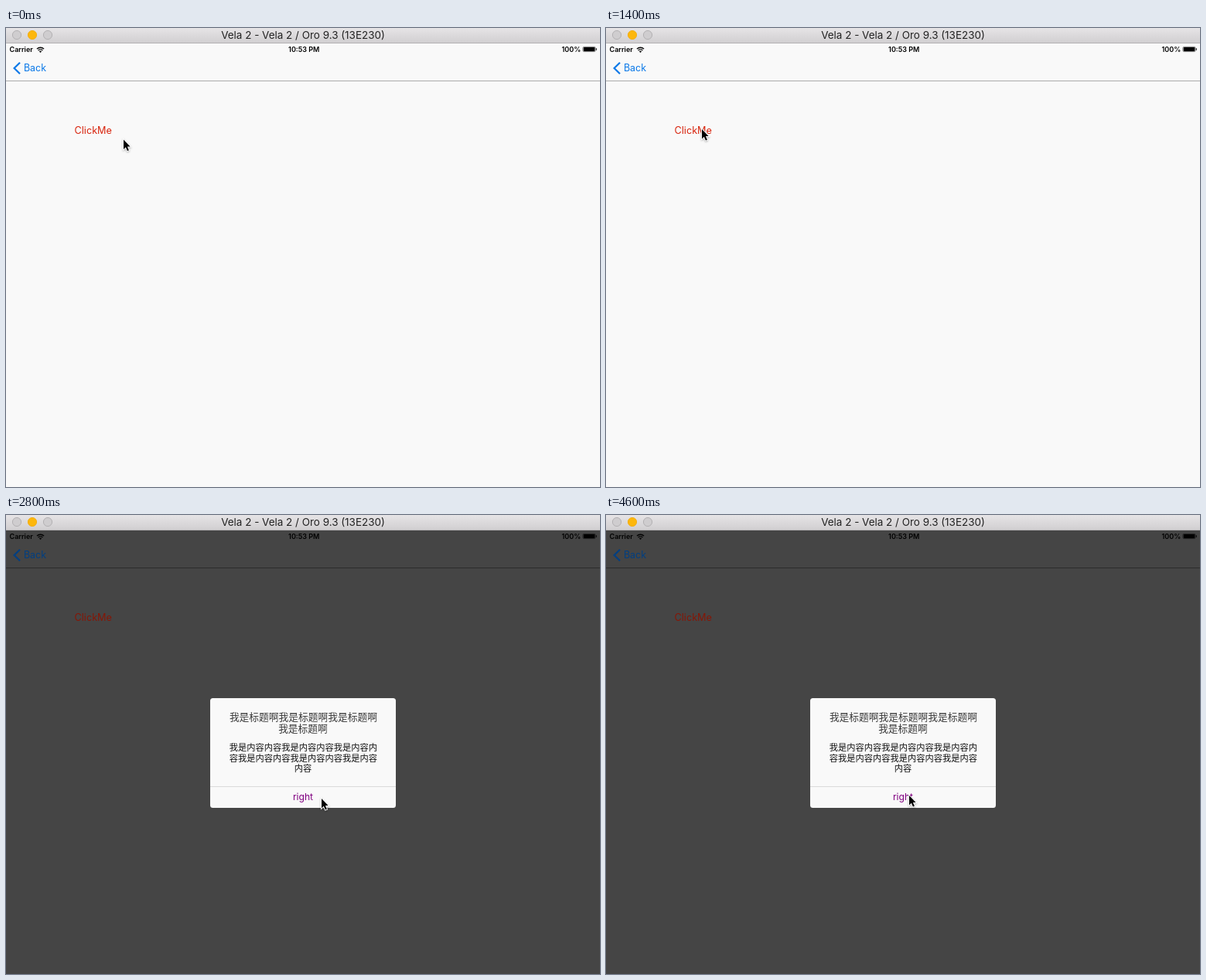
Write an HTML page that moves like this. It is 768x594 px and loops after 4.8 s.

```html
<!DOCTYPE html>
<html lang="zh">
<head>
<meta charset="utf-8">
<title>Alert demo</title>
<style>
  html, body { margin: 0; width: 100%; height: 100%; overflow: hidden; background: #f9f9f9; }
  svg { display: block; width: 768px; height: 594px; font-family: Inter, "Noto Sans CJK SC", "Noto Sans CJK", sans-serif; }
  #app { --page: #f9f9f9; --line: #acacac; --link: #0a78e8; --red: #d8230c; }
  #app.dim { --page: #454545; --line: #2b2b2b; --link: #003f82; --red: #861606; }
  .mid { text-anchor: middle; }
  .status { font-size: 9px; font-weight: 600; }
  .heading { font-size: 12.75px; fill: #383838; }
  .content { font-size: 11.25px; fill: #111; }
  #cursor { filter: drop-shadow(0 1px 1px rgba(0, 0, 0, .3)); }
</style>
</head>
<body>
<svg viewBox="0 0 768 594">
  <defs>
    <linearGradient id="bar" x2="0" y2="1">
      <stop stop-color="#e6e4e6"/>
      <stop offset="1" stop-color="#d0ced0"/>
    </linearGradient>
  </defs>

  <g id="app">
    <rect width="768" height="594" fill="var(--page)"/>
    <rect y="68" width="768" height="1" fill="var(--line)"/>
    <g class="status">
      <text x="4.5" y="31">Carrier</text>
      <text class="mid" x="385.2" y="31">10:53 PM</text>
      <text x="743.3" y="31" text-anchor="end">100%</text>
    </g>
    <g fill="none" stroke="#000" stroke-width="1.3">
      <path d="M39.9 27.1a6.6 6.6 0 0 1 9.2 0M41.6 29a4.2 4.2 0 0 1 5.8 0"/>
      <path d="M44.5 32l-1.6-1.7a2.4 2.4 0 0 1 3.2 0z" fill="#000" stroke="none"/>
      <rect x="745.9" y="24.4" width="16.2" height="6.2" rx="1.6" stroke-width=".5"/>
      <rect x="746.7" y="25.1" width="14.6" height="4.8" rx=".8" fill="#000" stroke="none"/>
      <path d="M763.2 26.2v2.6" stroke-width="1"/>
    </g>
    <path d="M18 44.7L10.6 52L18 59.3" fill="none" stroke="var(--link)" stroke-width="2.2"/>
    <text x="23" y="56" font-size="12.4" fill="var(--link)">Back</text>
    <text x="88.5" y="136.7" font-size="12.7" fill="var(--red)">ClickMe</text>
  </g>

  <rect width="768" height="20" fill="url(#bar)"/>
  <rect y="19" width="768" height="1" fill="#b4b2b4"/>
  <g fill="#cfcdcf" stroke="#b3b1b3" stroke-width="1">
    <circle cx="14" cy="9" r="5.6"/>
    <circle cx="34" cy="9" r="5.6" fill="#fdb70c" stroke="#f3ae12"/>
    <circle cx="54" cy="9" r="5.6"/>
  </g>
  <text class="mid" x="384" y="14" font-size="13.45" fill="#222">Vela 2 - Vela 2 / Oro 9.3 (13E230)</text>

  <g id="dialog" class="mid">
    <rect x="264" y="237" width="240" height="142" rx="3.5" fill="#f9f9f9"/>
    <rect x="264" y="351" width="240" height="1" fill="#dadada"/>
    <g class="heading">
      <text x="384.5" y="265.8">我是标题啊我是标题啊我是标题啊</text>
      <text x="384" y="280.8">我是标题啊</text>
    </g>
    <g class="content">
      <text x="384.5" y="305.4">我是内容内容我是内容内容我是内容内</text>
      <text x="384.5" y="319">容我是内容内容我是内容内容我是内容</text>
      <text x="384" y="332.2">内容</text>
    </g>
    <text x="384" y="369.2" font-size="12.1" fill="#800080">right</text>
  </g>

  <path id="cursor" d="M0 0V12.4L2.8 9.8L4.9 14.6L6.9 13.7L4.9 9H8.6Z"
        stroke="#fff" stroke-width="1.8" paint-order="stroke"/>
</svg>
<script>
const LOOP = 4800, STEP = 200, OPEN = 1600;
// [time, x, y] of the pointer tip, held until the next entry
const stops = [
  [0, 152, 144.5], [200, 132, 134.5], [400, 125, 132], [600, 124, 131],
  [2200, 135, 137], [2400, 249, 213], [2600, 402, 358], [2800, 408, 367],
  [3800, 402, 365], [4000, 396, 365], [4200, 393, 363], [4400, 392, 363]
];
const [app, dialog, cursor] = ["app", "dialog", "cursor"].map(id => document.getElementById(id));

function draw(now) {
  const t = Math.floor(now % LOOP / STEP) * STEP;
  const [, x, y] = stops.findLast(s => s[0] <= t);
  const open = t >= OPEN;
  app.classList.toggle("dim", open);
  dialog.style.display = open ? "" : "none";
  cursor.setAttribute("transform", `translate(${x} ${y})`);
}

function tick() {
  draw(performance.now());
  requestAnimationFrame(tick);
}
draw(0);
requestAnimationFrame(tick);
</script>
</body>
</html>
```
